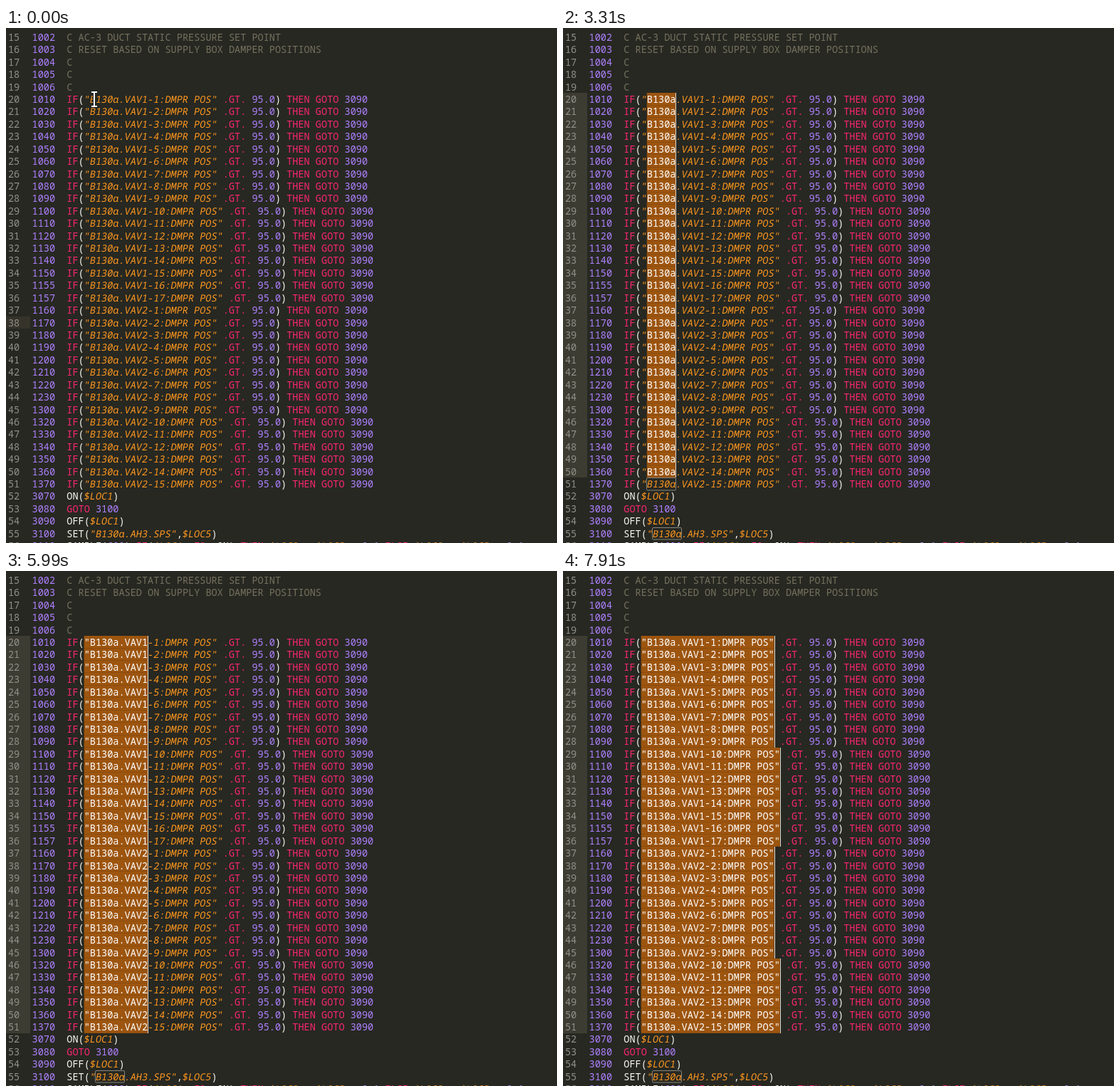
An HTML page with a canvas for the animation above (8 s loop, 774x723 px).

```html
<!DOCTYPE html>
<html lang="en">
<meta charset="utf-8">
<title>Multiple selection in a code editor</title>
<style>
  html, body { margin: 0; width: 100%; height: 100%; overflow: hidden; background: #272822; }
  canvas { display: block; }
</style>
<canvas id="stage" width="774" height="723"></canvas>
<script>
const W = 774, H = 723, LOOP = 8000;
const CHAR = 8.13, ROW = 17.42, LEFT = 36.5, FIRST = 20, COUNT = 32;
const FONT = '13.55px "Noto Sans Mono", "DejaVu Sans Mono", monospace';
const INK = { plain: '#f8f8f2', number: '#ae81ff', key: '#f92672', string: '#fd971f', note: '#75715e', gutter: '#90908a' };

const stage = document.getElementById('stage').getContext('2d');
const base = document.createElement('canvas');
base.width = W;
base.height = H;
const page = base.getContext('2d');
stage.font = page.font = FONT;

const colX = col => LEFT + col * CHAR;
const rowY = line => Math.round(91.2 + (line - FIRST) * ROW);
const baseline = line => 105 + (line - FIRST) * ROW;

// Code lines, beginning with line 14
const damperRow = (label, box) => `${label}  IF("B130a.VAV${box}:DMPR POS" .GT. 95.0) THEN GOTO 3090`;
const code = [
  '1001  C',
  '1002  C AC-3 DUCT STATIC PRESSURE SET POINT',
  '1003  C RESET BASED ON SUPPLY BOX DAMPER POSITIONS',
  '1004  C', '1005  C', '1006  C'
];
for (let i = 1; i <= 17; i++) code.push(damperRow(i < 16 ? 1000 + 10 * i : 1123 + 2 * i, '1-' + i));
for (let i = 1; i <= 15; i++) code.push(damperRow(i < 9 ? 1150 + 10 * i : i < 10 ? 1300 : 1220 + 10 * i, '2-' + i));
code[21] = damperRow(1155, '1-16');
code.push(
  '3070  ON($LOC1)',
  '3080  GOTO 3100',
  '3090  OFF($LOC1)',
  '3100  SET("B130a.AH3.SPS",$LOC5)',
  '3110  SAMPLE(600) IF($LOC1 .EQ. ON) THEN $LOC2 = $LOC5 - 0.1 ELSE $LOC2 = $LOC5 + 0.1'
);
const lineText = line => code[line - 14];

function write(ctx, text, x, y, color, italic) {
  ctx.fillStyle = color;
  [...text].forEach((ch, i) => {
    const px = x + i * CHAR;
    if (italic) {
      ctx.setTransform(1, 0, -0.18, 1, px - 0.8, y);
      ctx.fillText(ch === 'a' ? 'ɑ' : ch, 0, 0);
      ctx.setTransform(1, 0, 0, 1, 0, 0);
    } else ctx.fillText(ch, px, y);
  });
}

function writeNumber(ctx, line) {
  write(ctx, String(line), 2.9, baseline(line), INK.gutter);
}

function inkOf(token) {
  if (/^["$]/.test(token)) return 'string';
  if (/^(IF|THEN|GOTO|ELSE|\.[A-Z]+\.|[=+-])$/.test(token)) return 'key';
  return /^\d/.test(token) ? 'number' : 'plain';
}

function drawPage() {
  page.fillStyle = '#272822';
  page.fillRect(0, 0, W, H);
  code.forEach((text, i) => {
    const line = 14 + i, y = baseline(line);
    writeNumber(page, line);
    for (const m of text.matchAll(/^\d+|C( .*)?$|"[^"]*"|\$LOC\d|\.[A-Z]+\.|[A-Z]+|[\d.]+|\S/g)) {
      const ink = line < FIRST && m.index ? 'note' : inkOf(m[0]);
      write(page, m[0], colX(m.index), y, INK[ink], ink === 'string');
    }
  });
}

const pointer = [
  [0, 124, 100], [150, 122, 100], [290, 120, 100], [430, 119, 100], [560, 127, 100], [690, 142, 100],
  [820, 154, 100], [970, 162, 100], [1130, 382, 130], [1270, 560, 195], [1400, 680, 232],
  [1530, 732, 247], [1660, 748, 250], [1790, 752, 250]
];
const caretAlpha = [
  [0, 0], [430, 1], [3730, 0.5], [3860, 0], [4130, 1], [4980, 0.5], [5130, 0], [5690, 1], [7370, 0], [7910, 1]
];
// Selection end; the last value marks ends that follow the box number
const wordEnds = [[5690, 15, 0], [5990, 20, 0], [6120, 22, 1], [6260, 27, 1], [6390, 31, 1], [6820, 32, 1]];
const held = (list, t) => list.findLast(step => step[0] <= t);

function rowsPicked(t) {
  if (t < 430) return 0;
  if (t < 1910) return 1;
  if (t < 2450) return 2;
  if (t >= 3600) return COUNT;
  return Math.min(31, Math.round(5 + Math.floor((t - 2450) / 143) * 26 / 6));
}

// Selected columns of one row
function rangeAt(t, line) {
  if (t >= 5690) {
    const [, end, shifts] = held(wordEnds, t);
    return [9, end + (shifts && /-\d\d:/.test(lineText(line)) ? 1 : 0)];
  }
  if (t >= 4690) return [9, 9];
  if (t >= 4400) return [10, 10];
  const dragged = Math.round((held(pointer, t)[1] - colX(10)) / CHAR);
  return [10, 10 + Math.max(0, Math.min(5, dragged))];
}

function drawGutter(from, to, color) {
  stage.fillStyle = color;
  stage.fillRect(0, rowY(from), 34, rowY(to + 1) - rowY(from));
  for (let line = from; line <= to; line++) writeNumber(stage, line);
}

function drawBox(line, col) {
  const x = Math.round(colX(col)), y = rowY(line);
  stage.strokeStyle = '#85857c';
  stage.lineWidth = 1;
  stage.beginPath();
  stage.roundRect(x - 0.5, y + 0.5, 41, rowY(line + 1) - y - 0.5, 1.5);
  stage.stroke();
}

function drawSelection(line, [from, to]) {
  const y = rowY(line), x = colX(from), w = colX(to) - x, h = rowY(line + 1) - y;
  stage.fillStyle = '#9d550f';
  stage.fillRect(x, y, w, h);
  stage.fillStyle = 'rgba(0,0,0,.12)';
  stage.fillRect(x, y + h - 1, w, 1);
  write(stage, lineText(line).slice(from, to), x, baseline(line), '#fff');
}

function drawPointer(x, y) {
  for (const [color, width] of [['#222', 3.6], ['#fff', 2]]) {
    stage.strokeStyle = color;
    stage.lineWidth = width;
    stage.beginPath();
    stage.moveTo(x - 4, y - 10);
    stage.lineTo(x + 4, y - 10);
    stage.moveTo(x, y - 10);
    stage.lineTo(x, y + 10);
    stage.moveTo(x - 4, y + 10);
    stage.lineTo(x + 4, y + 10);
    stage.stroke();
  }
}

function draw(t) {
  stage.drawImage(base, 0, 0);
  const picked = rowsPicked(t), last = FIRST + picked - 1;
  if (picked) drawGutter(FIRST, last, '#3c3c32');
  else drawGutter(38, 38, '#36342a');

  if (t >= 1130) {
    const start = t >= 4400 && t < 5690 ? 0 : picked;
    for (let i = start; i < COUNT; i++) drawBox(FIRST + i, 10);
    drawBox(55, 11);
  }
  for (let line = FIRST; line <= last; line++) {
    const range = rangeAt(t, line);
    if (range[1] > range[0]) drawSelection(line, range);
    stage.globalAlpha = held(caretAlpha, t)[1];
    stage.fillStyle = '#d8d8d0';
    stage.fillRect(Math.round(colX(range[1])), rowY(line), 1, rowY(line + 1) - rowY(line));
    stage.globalAlpha = 1;
  }
  if (t < 2320) drawPointer(...held(pointer, t).slice(1));
}

drawPage();
const begin = performance.now();
function tick() {
  draw((performance.now() - begin) % LOOP);
  requestAnimationFrame(tick);
}
tick();
</script>
</html>
```
